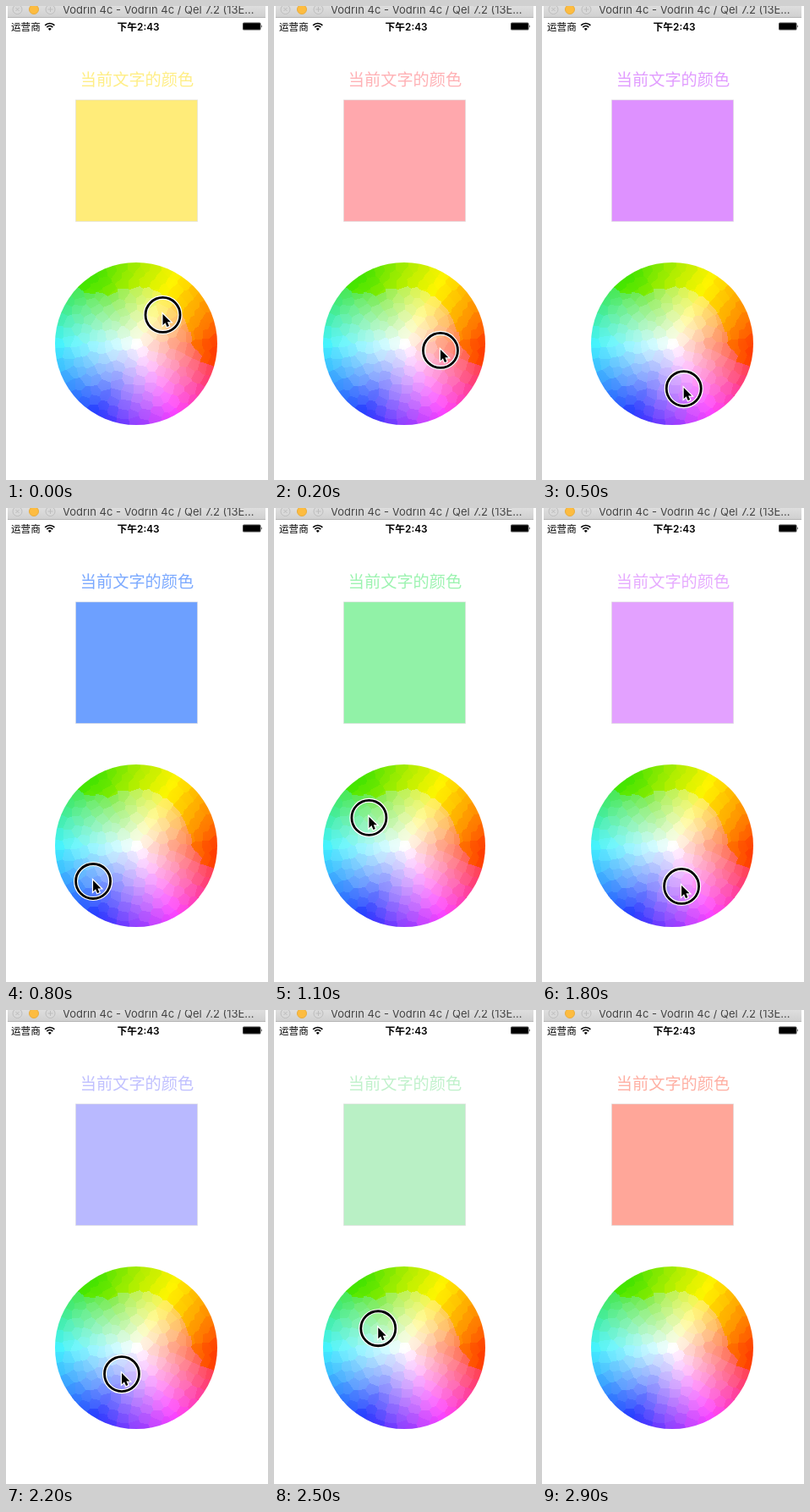
An HTML page with a canvas for the animation above (3 s loop, 310 by 560 pixels).

```html
<!DOCTYPE html>
<html lang="zh">
<head>
<meta charset="utf-8">
<style>
  html, body { margin: 0; width: 100%; height: 100%; overflow: hidden; background: #fff; }
  canvas { position: absolute; left: 58px; top: 303px; border-radius: 50%; }
  svg { position: absolute; left: 0; top: 0; }
  text { font-family: "Noto Sans CJK SC", "Noto Sans CJK", sans-serif; }
  .latin { font-family: Inter, "Noto Sans CJK SC", sans-serif; }
</style>
</head>
<body>
<canvas id="wheel" width="192" height="192"></canvas>
<svg width="310" height="560" viewBox="0 0 310 560">
  <defs>
    <linearGradient id="bar" x2="0" y2="1">
      <stop stop-color="#dedede"/><stop offset="1" stop-color="#d0d0d0"/>
    </linearGradient>
  </defs>

  <rect x="2" width="305" height="13" fill="url(#bar)"/>
  <path d="M2 13.5H307" stroke="#b4b4b4"/>
  <g fill="#d9d9d9" stroke="#bdbdbd">
    <circle cx="13.5" cy="4" r="5.5"/>
    <circle cx="33" cy="4" r="5.5" fill="#fdbc40" stroke="#e9ad3c"/>
    <circle cx="52.5" cy="4" r="5.5"/>
    <path d="M11.5 2l4 4m0-4l-4 4M49.5 4h6m-3-3v6"/>
  </g>
  <text class="latin" x="67" y="9" font-size="13" fill="#444">Vodrin 4c - Vodrin 4c / Qel 7.2 (13E...</text>

  <text x="6" y="28.5" font-size="11.6">运营商</text>
  <g fill="none" stroke="#000" stroke-width="1.7">
    <path d="M46.2 22.8a8 8 0 0 1 11.2 0M48.3 25.1a5 5 0 0 1 7 0"/>
    <path d="M51.8 29l-2-2.1a2.9 2.9 0 0 1 4 0z" fill="#000" stroke="none"/>
  </g>
  <text class="latin" x="156.5" y="28.5" font-size="11.8" font-weight="600" text-anchor="middle">下午2:43</text>
  <rect x="280" y="19.5" width="21.5" height="9" rx="1.5" fill="#444"/>
  <rect x="281" y="20.5" width="19.5" height="7" rx="1"/>
  <path d="M302.3 22.3q1.5 1.7 0 3.4z"/>

  <g id="sample">
    <text x="155" y="94" font-size="19.2" text-anchor="middle" fill-opacity=".9">当前文字的颜色</text>
    <rect x="82.5" y="111" width="144" height="143.5" stroke="#ddd" stroke-opacity=".6"/>
  </g>

  <g id="picker">
    <g fill="none">
      <circle r="20.5" stroke="#fff" stroke-width="5.2"/>
      <circle r="20.5" stroke="#000" stroke-width="2.8"/>
    </g>
    <path d="M0 -1V12L3 9.2L5 14L7.4 13L5.4 8.4H9.4Z" stroke="#fff" stroke-width="2.4" paint-order="stroke"/>
  </g>
</svg>
<script>
const LOOP = 3000, STEP = 100, RADIUS = 96, CENTER = [154, 399];
const RIM = [[255, 56, 0], [255, 243, 0], [64, 226, 0], [64, 243, 255], [32, 52, 255], [255, 64, 255]];
const BLUE_CUTOFF = 84;

const mix = (a, b, k) => a.map((v, i) => v + (b[i] - v) * k);

// Angles run clockwise from the right, in degrees.
function wheelColor(angle, radius) {
  const hue = (((-angle % 360) + 360) % 360) / 60, i = Math.floor(hue);
  const full = mix(RIM[i % 6], RIM[(i + 1) % 6], hue - i);
  return mix([255, 255, 255], full, Math.min(1, radius / RADIUS));
}

// Facets: each pixel leans to the colour of the nearest jittered seed; weak blue drops out.
function drawWheel() {
  let state = 7;
  const random = () => (state = state * 16807 % 2147483647) / 2147483647;
  const seeds = [];
  for (let ring = 0; ring < 10; ring++) {
    const count = Math.max(1, ring * 5);
    for (let i = 0; i < count; i++) {
      const angle = (i + ring * .37 + random() * .5) / count * 360;
      const radius = ring ? ring * 10 + random() * 5 : 0;
      const a = angle * Math.PI / 180;
      seeds.push({ x: RADIUS + radius * Math.cos(a), y: RADIUS + radius * Math.sin(a), color: wheelColor(angle, radius) });
    }
  }
  const size = RADIUS * 2, ctx = wheel.getContext("2d"), image = ctx.createImageData(size, size);
  for (let y = 0; y < size; y++) for (let x = 0; x < size; x++) {
    let best, nearest = Infinity;
    for (const seed of seeds) {
      const d = (seed.x - x) ** 2 + (seed.y - y) ** 2;
      if (d < nearest) { nearest = d; best = seed; }
    }
    const dx = x - RADIUS, dy = y - RADIUS;
    const smooth = wheelColor(Math.atan2(dy, dx) * 180 / Math.PI, Math.hypot(dx, dy));
    const [r, g, b] = mix(smooth, best.color, .7);
    image.data.set([r, g, b < BLUE_CUTOFF ? 0 : b, 255], (y * size + x) * 4);
  }
  ctx.putImageData(image, 0, 0);
}

// Time, angle, radius, picked colour
const drag = [
  [0, -47.2, 46.4, [255, 236, 121]],
  [200, 10.5, 43.7, [255, 168, 173]],
  [800, 140.5, 66, [109, 160, 255]],
  [1400, 296.6, 40.3, [243, 249, 153]],
  [1800, 437, 49.2, [227, 161, 255]],
  [2200, 478.7, 35.4, [185, 185, 255]],
  [2900, 707, 42, [255, 166, 153]]
].map(([time, angle, radius, color]) => {
  const base = wheelColor(angle, radius);
  return { time, pose: [angle, radius, ...color.map((c, i) => c - base[i])] };
});

function render(t) {
  const i = Math.max(1, drag.findIndex(key => key.time >= t));
  const from = drag[i - 1], to = drag[i];
  const [angle, radius, ...shift] = mix(from.pose, to.pose, (t - from.time) / (to.time - from.time));
  const a = angle * Math.PI / 180;
  const x = CENTER[0] + radius * Math.cos(a), y = CENTER[1] + radius * Math.sin(a);
  picker.setAttribute("transform", `translate(${x} ${y})`);
  picker.style.display = t < 2900 ? "" : "none";
  const color = wheelColor(angle, radius).map((c, k) => Math.round(c + shift[k]));
  sample.setAttribute("fill", `rgb(${color})`);
}

function frame() {
  render(Math.floor(performance.now() % LOOP / STEP) * STEP);
  requestAnimationFrame(frame);
}

const [wheel, sample, picker] = ["wheel", "sample", "picker"].map(id => document.getElementById(id));
drawWheel();
frame();
</script>
</body>
</html>
```
